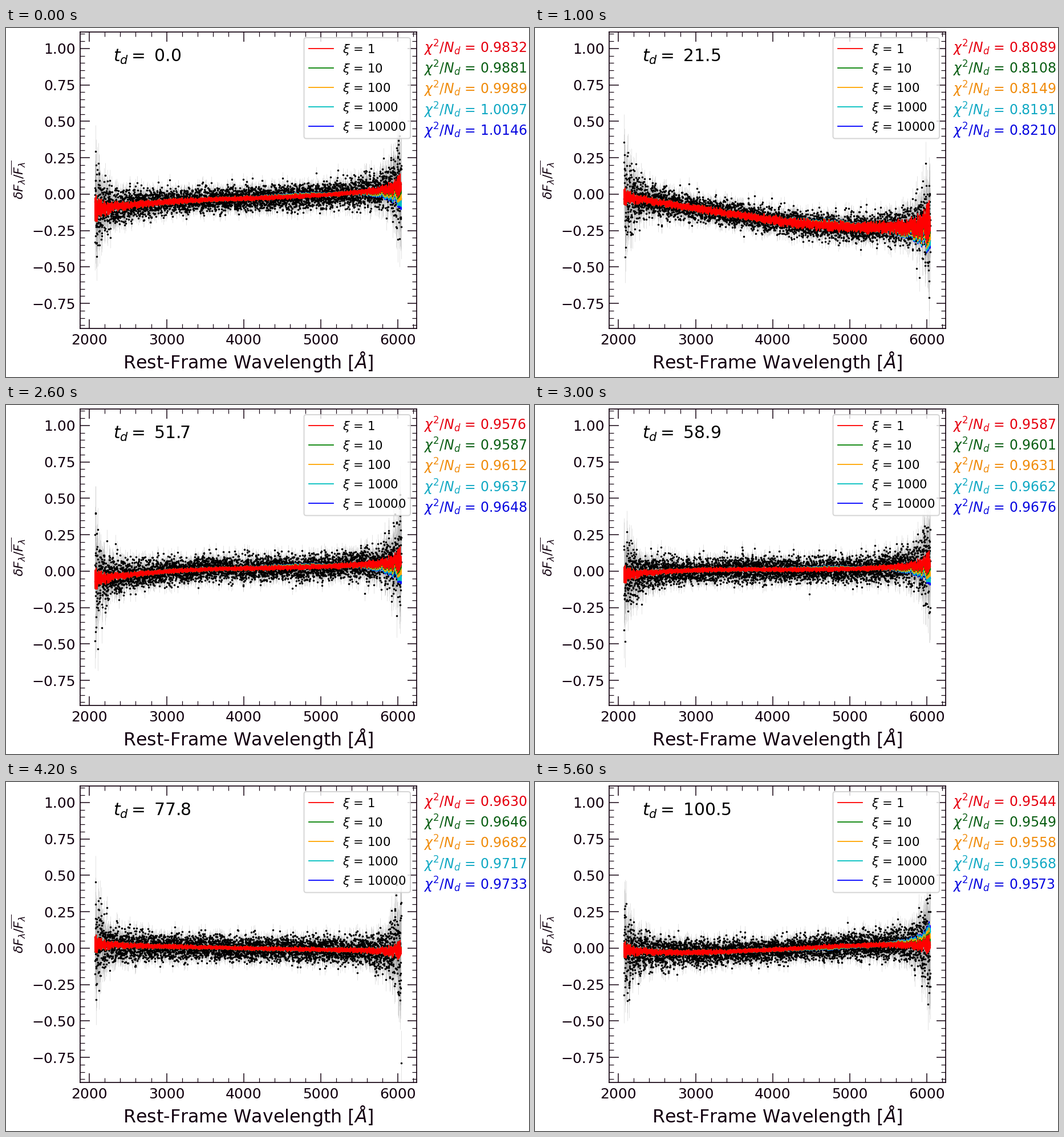
A matplotlib script for the animation above (5800 ms loop, 917 by 611 pixels).

```python
import numpy as np
import matplotlib.pyplot as plt
from matplotlib.animation import FuncAnimation
from matplotlib.collections import LineCollection
from matplotlib.patches import FancyBboxPatch
from matplotlib.ticker import MultipleLocator

W, H, DPI = 917, 611, 64
PX = 72 / DPI                       # points per pixel
FRAMES, INTERVAL = 29, 200
INK = "#12000f"
LINE_COLORS = ["red", "green", "orange", "c", "blue"]
TEXT_COLORS = ["#e6000f", "#0b5f14", "#f08c0c", "#12a9c4", "#0808e0"]
plt.rcParams["font.family"] = "DejaVu Sans"

# Key epochs: step, delay, best chi2, chi2 rise, cubic trend (hook, bow, tilt, level)
EPOCHS = np.array([
    (0, 0.0, .9832, .0314, .045, .000, .035, -.028),
    (5, 21.5, .8089, .0121, .040, .067, -.135, -.180),
    (9, 38.4, .9084, .0364, .087, .040, .008, -.095),
    (13, 51.7, .9576, .0072, .044, -.015, .021, .020),
    (18, 69.7, .9603, .0114, .038, .022, -.036, .000),
    (24, 86.0, .9657, .0092, -.043, -.016, -.005, .000),
    (28, 100.5, .9544, .0029, -.040, .011, .056, -.008)])

k = np.arange(5) / 4
STIFFNESS = k * k * (3 - 2 * k)     # how far each fit departs from the first

wave = np.linspace(2072, 6042, 4000)
u = (wave - 4050) / 2000
lo, hi = wave - wave[0], wave[-1] - wave


def rise(dist, near, far):
    return near * np.exp(-dist / 75) + far * np.exp(-dist / 300)


spread = 1 + rise(lo, 2.6, 1) + rise(hi, 3, 1.3)
grain = np.clip(np.random.default_rng(4).normal(size=wave.size), -2.6, 2.6)
tail = np.clip((wave - 5300) / 740, 0, None) ** 2 + np.exp(-hi / 20)
sag = tail - .15 * np.exp(-((wave - 4700) / 400) ** 2)


def epoch(i):
    return [np.interp(i, EPOCHS[:, 0], col) for col in EPOCHS.T[1:]]


fig = plt.figure(figsize=(W / DPI, H / DPI), dpi=DPI, facecolor="white")
ax = fig.add_axes([130 / W, 1 - 526 / H, 590 / W, 519 / H])
ax.set(xlim=(1879, 6243), ylim=(-.9216, 1.1137))
ax.xaxis.set_major_locator(MultipleLocator(1000))
ax.xaxis.set_minor_locator(MultipleLocator(200))
ax.yaxis.set_major_locator(MultipleLocator(.25))
ax.yaxis.set_minor_locator(MultipleLocator(.05))
ax.tick_params(which="both", direction="in", top=True, right=True,
               width=1.5 * PX, color=INK)
ax.tick_params(which="major", length=16.5 * PX, pad=8.5 * PX,
               labelsize=25 * PX, labelcolor=INK)
ax.tick_params(which="minor", length=8 * PX, width=1.2 * PX)
for spine in ax.spines.values():
    spine.set(linewidth=1.7 * PX, color=INK)

bars = LineCollection([], colors="gray", alpha=.22, linewidths=1 * PX, zorder=1)
ax.add_collection(bars, autolim=False)
dots, = ax.plot([], [], "o", color="black", ms=3.5 * PX, mew=0, zorder=2)
fits = [ax.plot([], [], color=c, lw=2 * PX, zorder=2.4 - .05 * n)[0]
        for n, c in enumerate(LINE_COLORS)]

# Overlay in pixel coordinates, y pointing down.
page = fig.add_axes([0, 0, 1, 1], zorder=5)
page.set(xlim=(0, W), ylim=(H, 0))
page.axis("off")


def label(x, y, text, size, color="black", **kw):
    return page.text(x, y, text, fontsize=size * PX, color=color,
                     va="baseline", **kw)


label(425, 596, r"Rest-Frame Wavelength [$\AA$]", 31.8, INK, ha="center")
label(31, 266, r"$\delta F_\lambda/\overline{F_\lambda}$", 22.4, INK,
      ha="center", rotation=90, rotation_mode="anchor")

page.add_patch(FancyBboxPatch(
    (526.5, 21), 178.5, 168.5, boxstyle="round,pad=4,rounding_size=4",
    fc=(1, 1, 1, .8), ec=(.8, .8, .8, .8), lw=2 * PX))
for n, color in enumerate(LINE_COLORS):
    y = 36 + 34.1 * n
    page.plot([530.5, 574], [y, y], color=color, lw=1.8 * PX)
    label(590, y + 8, rf"$\xi$ = {10 ** n}", 21.2)

delay_text = label(188.5, 59, "", 29.8)
chi_texts = [label(732, 43.5 + 36.2 * n, "", 23.6, c)
             for n, c in enumerate(TEXT_COLORS)]


def update(i):
    delay, chi, chi_rise, *cubic = epoch(i)
    base = np.polyval(cubic, u)
    ripple = (.015 + .11 * np.abs(base)) * spread * grain / 2.5
    for fit, text, s in zip(fits, chi_texts, STIFFNESS):
        fit.set_data(wave, base - 1.5 * cubic[0] * s * sag + ripple)
        text.set_text(rf"$\chi^2/N_d$ = {chi + chi_rise * s:.4f}")
    delay_text.set_text(rf"$t_d = $ {delay:.1f}")

    rng = np.random.default_rng(100 + i)
    err = .042 * spread
    flux = base + err * rng.normal(size=wave.size)
    dots.set_data(wave, flux)
    ends = np.stack([flux - err, flux + err], axis=1)
    bars.set_segments(np.stack([np.stack([wave, wave], axis=1), ends], axis=2))
    return [bars, dots, *fits, delay_text, *chi_texts]


anim = FuncAnimation(fig, update, frames=FRAMES, interval=INTERVAL,
                     repeat=True, repeat_delay=0, blit=False)
plt.show()
```
